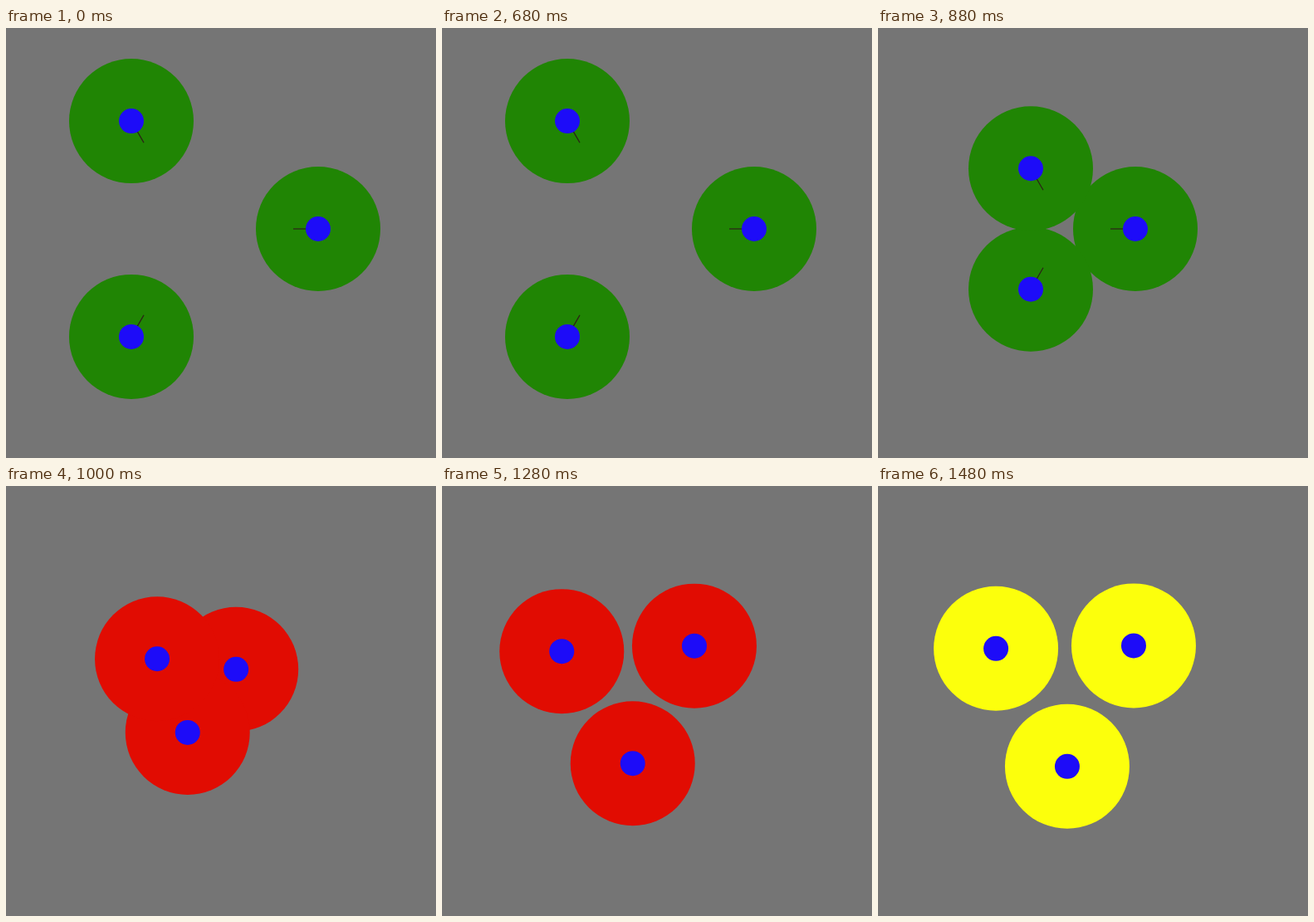
These frames come from a looping animation (518 by 518 pixels, 2.84 s). An HTML page with a canvas:

```html
<!DOCTYPE html>
<html lang="en">
<head>
<meta charset="utf-8">
<title>Three discs colliding</title>
<style>
  html, body { margin: 0; width: 100%; height: 100%; overflow: hidden; background: #757575; }
  canvas { display: block; width: 518px; height: 518px; }
</style>
</head>
<body>
<canvas id="stage" width="518" height="518"></canvas>
<script>
const ctx = document.getElementById('stage').getContext('2d');
const LOOP = 2840, TICK = 40;
const START = 680, CONTACT = 880, RELEASE = 1200, REST = 1480;
const CENTER = { x: 226, y: 242 };
const COLORS = { moving: '#208504', colliding: '#e10c02', resting: '#fcff0c', core: '#1d0cf8' };

// Path of the right-hand disc, relative to the center, one point per tick of contact.
const contactPath = [
  [84, 0], [71, -3.5], [59.6, -11], [51.2, -21.2], [47.5, -31],
  [48.6, -39], [54.4, -44.3], [64.1, -47.2], [71.8, -49]
];
const restPoint = [82.5, -49.6];

function position(time) {
  if (time <= CONTACT) {
    const progress = Math.max(0, (time - START) / (CONTACT - START));
    return [150 - 66 * progress, 0];
  }
  if (time <= RELEASE) return contactPath[(time - CONTACT) / TICK];
  const remaining = 0.65 ** ((Math.min(time, REST) - RELEASE) / TICK);
  const release = contactPath[contactPath.length - 1];
  return restPoint.map((end, axis) => end + (release[axis] - end) * remaining);
}

function circle(x, y, radius, color) {
  ctx.fillStyle = color;
  ctx.beginPath();
  ctx.arc(x, y, radius, 0, Math.PI * 2);
  ctx.fill();
}

function draw(time) {
  const state = time <= CONTACT ? 'moving' : time < REST ? 'colliding' : 'resting';
  const [px, py] = position(time);
  ctx.fillStyle = '#757575';
  ctx.fillRect(0, 0, 518, 518);

  const discs = [0, 1, 2].map(i => {
    const angle = i * Math.PI * 2 / 3, c = Math.cos(angle), s = Math.sin(angle);
    return { x: CENTER.x + px * c - py * s, y: CENTER.y + px * s + py * c, c, s };
  });
  discs.forEach(d => circle(d.x, d.y, 75, COLORS[state]));
  discs.forEach(d => {
    if (state === 'moving') {
      ctx.strokeStyle = '#2c2018';
      ctx.lineWidth = 1.2;
      ctx.beginPath();
      ctx.moveTo(d.x, d.y);
      ctx.lineTo(d.x - 30 * d.c, d.y - 30 * d.s);
      ctx.stroke();
    }
    circle(d.x, d.y, 15, COLORS.core);
  });
}

function frame() {
  const time = performance.now() % LOOP;
  draw(Math.floor(time / TICK) * TICK);
  requestAnimationFrame(frame);
}
frame();
</script>
</body>
</html>
```
